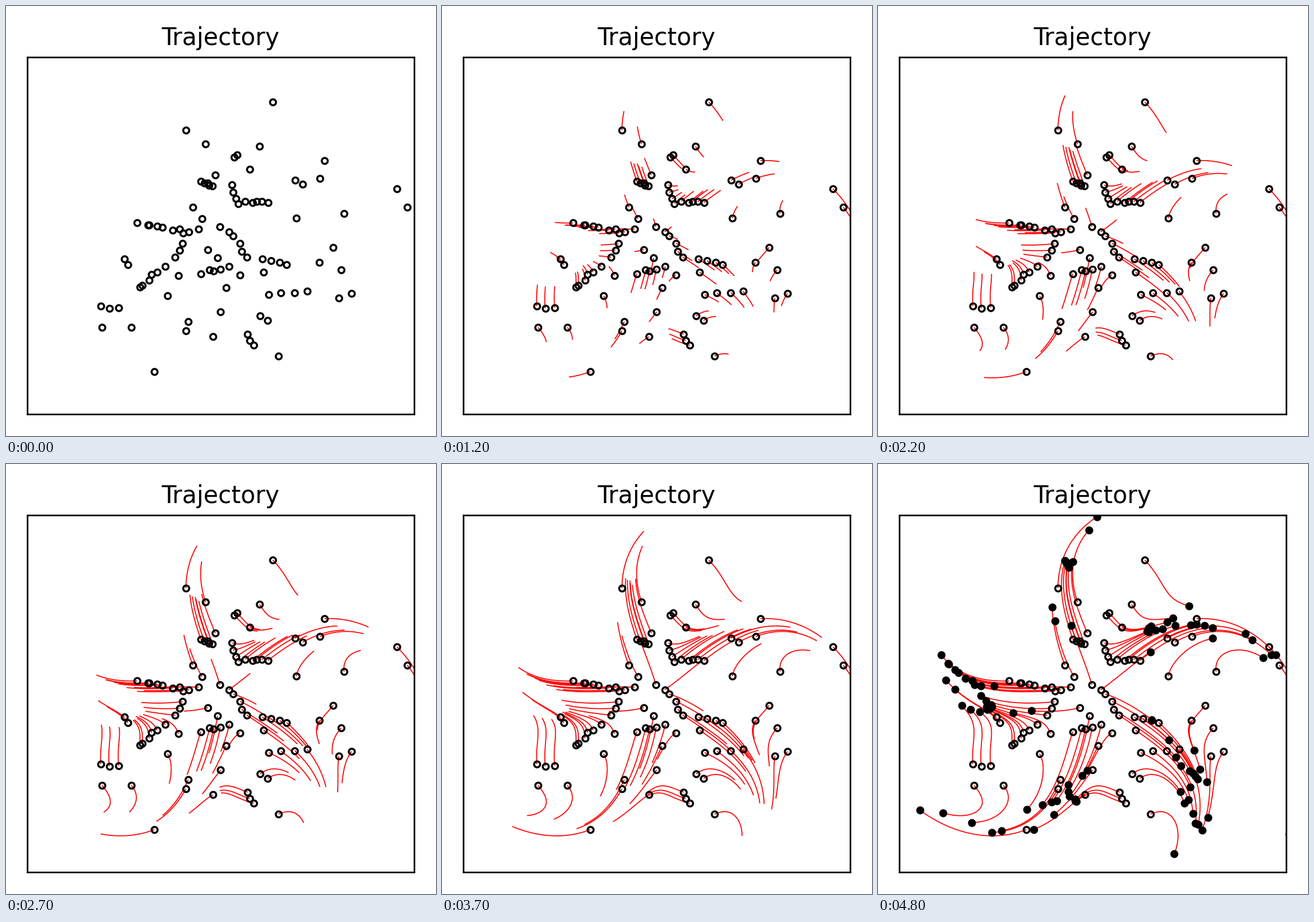
Write a matplotlib script that moves like this. It is 748 px wide and 748 px high and loops after 5.1 s.

```python
import numpy as np
import matplotlib.pyplot as plt
from matplotlib.animation import FuncAnimation
from matplotlib.collections import LineCollection

SIZE, DPI = 748, 250
STEPS, HOLD = 48, 3                 # steps of motion, frames the end is held
LEFT, RIGHT, TOP, BOTTOM = 36.5, 710, 89, 710
CENTER = np.array([373.25, 399.5])
ARM, EDGE = 72, 32                  # degrees between arms, trailing edge of a sector

rng = np.random.default_rng(4)


def strand(x0, y0, x1, y1, n, jitter=1.5):
    """Dots spaced along a line, slightly scattered."""
    line = np.linspace((x0, y0), (x1, y1), n)
    return line + rng.normal(0, jitter, line.shape)


def ridge(r):
    """Angle in degrees of a pinwheel arm at radius r."""
    return 119 - 2 * np.exp(r / 113)


def trace(points):
    """Let points drift outward along the nearest arm, and inward between arms."""
    x, y = (points - CENTER).T
    r, angle = np.hypot(x, y), np.degrees(np.arctan2(-y, x))
    off = (angle - ridge(r) + EDGE) % ARM - EDGE
    base = angle - ridge(r) - off
    path = []
    for _ in range(STEPS + 1):
        a = np.radians(base + off + ridge(r))
        path.append(CENTER + np.c_[r * np.cos(a), -r * np.sin(a)])
        near = np.exp(-((off * np.minimum(1, r / 180) + 4) / 22) ** 2)
        speed = 3.7 * np.tanh(r / 60) * (1 - r / 800)
        r = r + speed * (1.7 * near - 0.7)
        off = off * (1 - 0.028)
    return np.stack(path, axis=1)


strands = [
    strand(230, 378, 336, 391, 10, 3), strand(340, 306, 358, 316, 5),
    strand(394, 311, 403, 345, 4), strand(418, 340, 456, 342, 5, 2),
    strand(271, 455, 234, 488, 6, 3), strand(293, 436, 307, 413, 3),
    strand(389, 391, 419, 435, 5), strand(340, 466, 374, 458, 3),
    strand(350, 420, 409, 470, 4), strand(447, 442, 488, 448, 4),
    strand(456, 502, 523, 495, 4), strand(421, 570, 431, 590, 3),
    strand(164, 522, 196, 526, 3), strand(382, 493, 360, 572, 3),
]
outer = [
    (464, 167), (313, 216), (347, 240), (441, 244), (397, 263), (402, 259),
    (424, 284), (364, 294), (554, 269), (546, 300), (503, 303), (516, 310),
    (505, 369), (588, 361), (569, 420), (680, 318), (698, 350), (545, 446),
    (583, 459), (601, 500), (579, 508), (448, 463), (442, 539), (455, 547),
    (474, 609), (258, 636), (361, 461), (317, 549), (313, 565), (281, 504),
    (300, 469), (218, 559), (167, 559), (206, 440), (212, 450), (325, 350),
    (341, 370), (372, 384),
]
paths = trace(np.concatenate(strands + [outer]))

fig = plt.figure(figsize=(SIZE / DPI, SIZE / DPI), dpi=DPI, facecolor="white")
ax = fig.add_axes([LEFT / SIZE, 1 - BOTTOM / SIZE,
                   (RIGHT - LEFT) / SIZE, (BOTTOM - TOP) / SIZE])
ax.set(xlim=(LEFT, RIGHT), ylim=(BOTTOM, TOP), xticks=[], yticks=[])
ax.set_title("Trajectory", fontname="DejaVu Sans", fontsize=12)

trails = LineCollection([], colors="red", linewidths=0.5, zorder=2)
ax.add_collection(trails, autolim=False)


def dots(points, fill):
    return ax.plot(*points.T, "o", ms=3, mew=1, mec="black", mfc=fill, zorder=3)[0]


starts = dots(paths[:, 0], "none")
ends = dots(paths[:, -1], "black")


def update(frame):
    step = min(frame, STEPS)
    trails.set_segments(paths[:, :step + 1] if step else [])
    ends.set_visible(step == STEPS)
    return trails, ends


anim = FuncAnimation(fig, update, frames=STEPS + HOLD, interval=100,
                     init_func=lambda: update(0), repeat=True)
plt.show()
```
